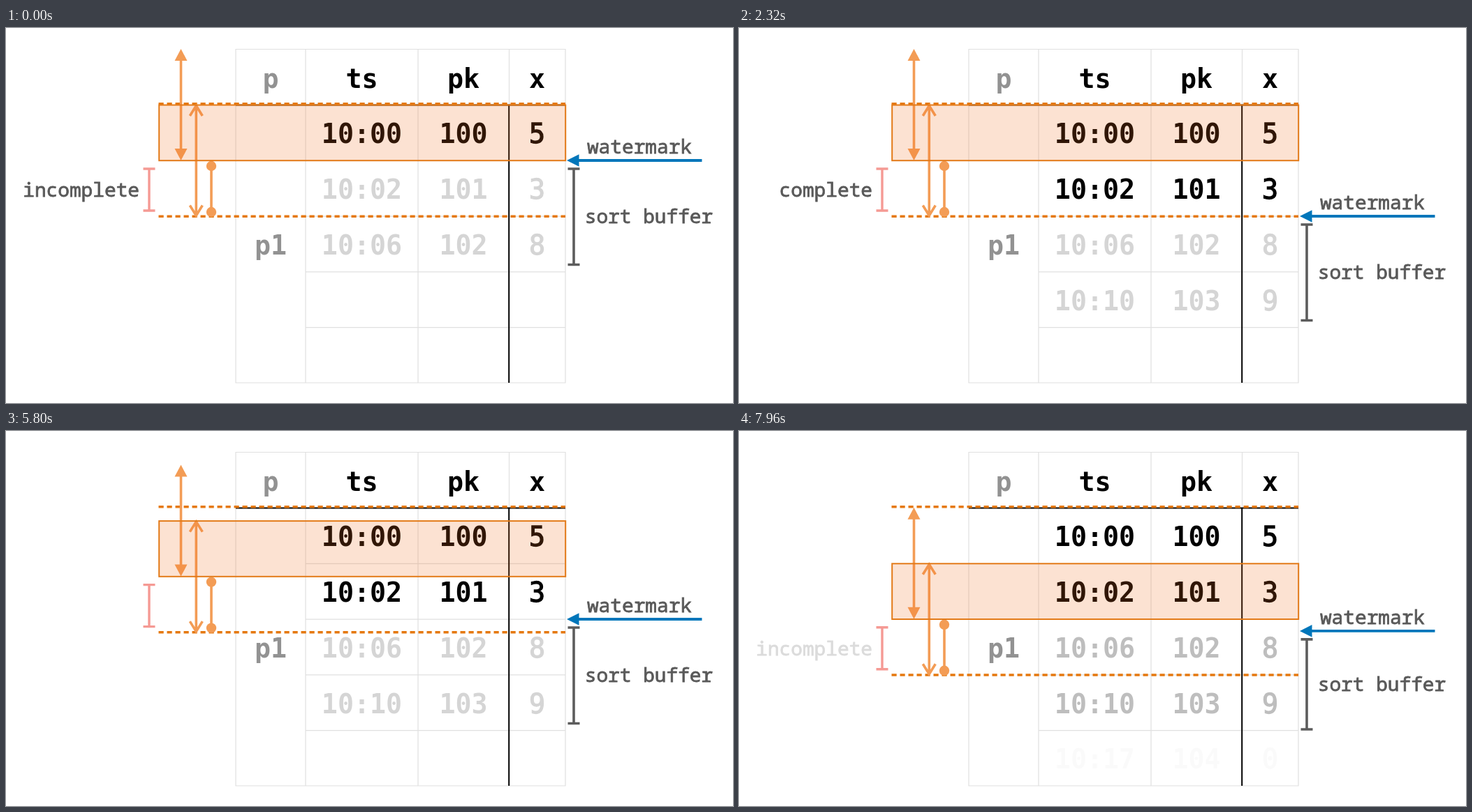
These frames come from a looping animation (1041 px wide and 538 px high, 8 s). An HTML page:

```html
<!DOCTYPE html>
<html lang="en">
<head>
<meta charset="utf-8">
<title>Watermark and sort buffer</title>
<style>
  html, body { margin: 0; width: 100%; height: 100%; overflow: hidden; background: #fff; }
  svg { display: block; width: 100%; height: 100%; }
  .cell { font: 700 38.3px "DejaVu Sans Mono", monospace; text-anchor: middle; stroke-width: 0; }
  .cell.plain { font-weight: 400; stroke-width: 1.3; }
  .label {
    font: 500 27.8px "Noto Sans Mono", "DejaVu Sans Mono", monospace;
    text-anchor: middle; fill: #595959; stroke: #595959; stroke-width: 0.8;
  }
  .label.end { text-anchor: end; }
  .grid { fill: none; stroke: #e0e0e0; stroke-width: 1.2; }
  .axis { fill: none; stroke: #000; stroke-width: 2; }
  .dash { fill: none; stroke: #e5780f; stroke-width: 3.6; stroke-dasharray: 7.2 4.8; }
  .span { fill: none; stroke: #f39c55; stroke-width: 3.6; }
  .tip { fill: #f39c55; }
</style>
</head>
<body>
<svg id="stage" viewBox="0 0 1041 538"></svg>
<script>
const LOOP = 8000;
const ROW = 79.8;
const columns = [379, 509.5, 655, 760.5];
const records = [
  ["10:00", "100", "5"],
  ["10:02", "101", "3"],
  ["10:06", "102", "8"],
  ["10:10", "103", "9"],
  ["10:17", "104", "0"]
];

function add(tag, attrs, parent = stage, text = "") {
  const node = document.createElementNS("http://www.w3.org/2000/svg", tag);
  set(node, attrs);
  node.textContent = text;
  return parent.appendChild(node);
}
function set(node, attrs) {
  for (const key in attrs) node.setAttribute(key, attrs[key]);
}
const group = () => add("g", {});
const path = (d, cls, parent) => add("path", { d, class: cls }, parent);
const label = (text, x, y, parent, cls = "label") => add("text", { x, y, class: cls }, parent, text);
const shift = (node, y) => set(node, { transform: `translate(0 ${y})` });
const bracket = (x, top, bottom) =>
  `M${x - 8.5} ${top}h17M${x - 8.5} ${bottom}h17M${x} ${top}V${bottom}`;

// Table
path("M329 30.5H801V509H329ZM429 30.5V509M590 30.5V509M720.5 30.5V110", "grid");
for (let i = 1; i < 5; i++) path(`M429 ${110.5 + ROW * i}H801`, "grid");
path("M329 110.5H801M720.2 110V509", "axis");

["p", "ts", "pk", "x"].forEach((name, i) =>
  add("text", { x: columns[i], y: 85.5, class: "cell", fill: i ? "#000" : "#929292" }, stage, name));
add("text", { x: 379, y: 324.8, class: "cell", fill: "#929292" }, stage, "p1");

const rows = records.map((values, r) => {
  const row = group();
  values.forEach((value, i) => add("text", {
    x: columns[i + 1], y: 165.2 + ROW * r, class: i === 2 ? "cell plain" : "cell"
  }, row, value));
  return row;
});

// Moving window with its range arrows
path("M218.5 108.8H801", "dash");
const frame = group();
path("M218.5 270.2H801", "dash", frame);
path("M250.5 44V176", "span", frame);
path("M250.5 30l9 17h-18ZM250.5 190l9-17h-18Z", "tip", frame);
path("M272.3 112V269M263.3 126l9-14.5 9 14.5M263.3 254.5l9 14.5 9-14.5", "span", frame);
path("M294 198V264", "span", frame);
for (const cy of [198, 264]) add("circle", { cx: 294, cy, r: 7.2, class: "tip" }, frame);
add("path", { d: bracket(205, 202, 262), fill: "none", stroke: "#f59a94", "stroke-width": 3.4 }, frame);
add("rect", {
  x: 219.2, y: 110.5, width: 582, height: 79.7,
  fill: "#f17022", "fill-opacity": 0.2, stroke: "#e37a18", "stroke-width": 2
}, frame);

// Side labels
const waiting = label("incomplete", 191, 242, stage, "label end");
const ready = label("complete", 191, 242, stage, "label end");
const waitingNext = label("incomplete", 191, 322, stage, "label end");

const output = group();
add("path", { d: "M803 151H982", stroke: "#ee7203", "stroke-width": 3.8 }, output);
add("path", { d: "M997 151l-18-9v18Z", fill: "#ee7203" }, output);
label("output", 894.5, 140, output);

const mark = group();
add("path", { d: "M818 0H996.5", stroke: "#0076ba", "stroke-width": 3.8 }, mark);
add("path", { d: "M803 0l17.5-8.8v17.6Z", fill: "#0076ba" }, mark);
label("watermark", 907, -10, mark);

const buffer = add("path", { fill: "none", stroke: "#5c5c5c", "stroke-width": 3.6 });
const bufferLabel = label("sort buffer", 920.5, 0);

// Motion
const clamp = v => Math.min(1, Math.max(0, v));
const ramp = (t, from, length) => clamp((t - from) / length);
const smooth = u => (1 - Math.cos(Math.PI * u)) / 2;

// cubic-bezier(.4, 0, .2, 1)
function ease(x) {
  if (x <= 0 || x >= 1) return clamp(x);
  let lo = 0, hi = 1;
  for (let i = 0; i < 24; i++) {
    const s = (lo + hi) / 2, q = 1 - s;
    if (1.2 * q * q * s + 0.6 * q * s * s + s * s * s < x) lo = s; else hi = s;
  }
  return lo * lo * (3 - 2 * lo);
}

const move = (t, start) => ease(ramp(t, start, 720));
const fade = (t, start, length) => smooth(ramp(t, start, length));

function draw(t) {
  const first = move(t, 1610), slide = move(t, 5622), second = move(t, 7830);

  const darkness = [1, first, second, second, 0];
  const presence = [1, 1, 1, first, second];
  rows.forEach((row, i) => {
    const grey = Math.round(213 * (1 - darkness[i]));
    const ink = `rgb(${grey},${grey},${grey})`;
    set(row, { fill: ink, stroke: ink, opacity: presence[i] });
  });

  shift(frame, slide * ROW);

  const level = 190 + 80 * first + 160 * second;
  const top = level + 12, bottom = 339.5 + 80 * first + 80 * second;
  shift(mark, level);
  set(buffer, { d: bracket(813, top, bottom) });
  set(bufferLabel, { y: (top + bottom) / 2 + 9.5 });

  const leave = 1 - fade(t, 5615, 165);
  set(waiting, { opacity: 1 - fade(t, 1610, 190) });
  set(ready, { opacity: fade(t, 1980, 340) * leave });
  set(waitingNext, { opacity: 0.21 * fade(t, 5980, 90) });
  set(output, { opacity: fade(t, 3580, 500) * leave });
}

const origin = performance.now();
function tick() {
  draw((performance.now() - origin) % LOOP);
  requestAnimationFrame(tick);
}
draw(0);
requestAnimationFrame(tick);
</script>
</body>
</html>
```
